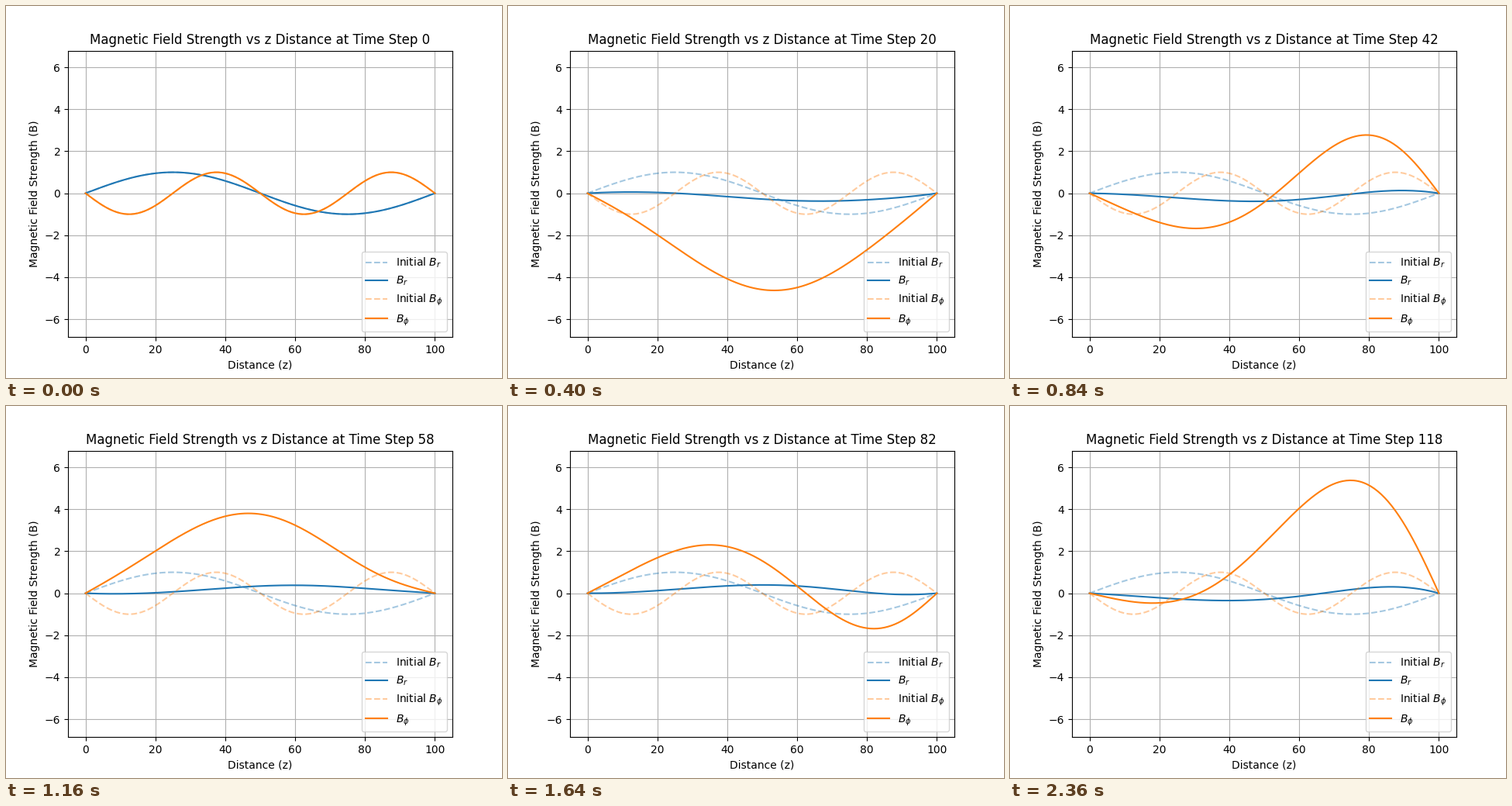
Animation, 640 px wide and 480 px high, one loop 2.4 s. Source, as a matplotlib script:

```python
import numpy as np
import matplotlib.pyplot as plt
from matplotlib.animation import FuncAnimation

FRAMES, INTERVAL, STRIDE = 60, 40, 2
MODES = 24

# Dynamo wave, all rates per time step
OMEGA = np.pi / 13.04   # oscillation
GROWTH = 0.0004         # amplitude growth
SHEAR = 4.6             # B_r -> B_phi
TAIL, FADE = 0.78, 6.0  # early loss of strength

n = np.arange(1, MODES + 1)
row, col = np.meshgrid(n, n, indexing="ij")
odd = (row + col) % 2 == 1
slope = np.where(odd, 4 * row * col / np.where(odd, row**2 - col**2, 1), 0)
decay = np.diag((n * np.pi) ** 2)


def system(dynamo):
    """Sine-mode matrix for (B_r, B_phi) with zero field at both ends."""
    return np.block([[-decay, -dynamo * slope], [np.eye(MODES), -decay]])


def leading(dynamo):
    values = np.linalg.eigvals(system(dynamo))
    return values[np.argmax(values.real)]


def find_dynamo(low=200.0, high=800.0):
    for _ in range(40):
        mid = (low + high) / 2
        value = leading(mid)
        if value.real / abs(value.imag) < GROWTH / OMEGA:
            low = mid
        else:
            high = mid
    return mid


dynamo = find_dynamo()
eta = OMEGA / abs(leading(dynamo).imag)
rates, vectors = np.linalg.eig(eta * system(dynamo))

z = np.linspace(0, 100, 201)
basis = np.sin(np.pi * np.outer(z / 100, n))
br0 = np.sin(2 * np.pi * z / 100)
bphi0 = -np.sin(4 * np.pi * z / 100)

start = np.zeros(2 * MODES)
start[1] = SHEAR / eta
start[MODES + 3] = -1
weights = np.linalg.solve(vectors, start.astype(complex))


def fields(step):
    state = (vectors @ (weights * np.exp(rates * step))).real
    state *= TAIL + (1 - TAIL) * np.exp(-step / FADE)
    return basis @ state[:MODES] * eta / SHEAR, basis @ state[MODES:]


fig, ax = plt.subplots(figsize=(6.4, 4.8), dpi=100)
ax.plot(z, br0, "--", color="C0", alpha=0.4, label="Initial $B_r$")
br_line, = ax.plot(z, br0, color="C0", label="$B_r$")
ax.plot(z, bphi0, "--", color="C1", alpha=0.4, label=r"Initial $B_\phi$")
bphi_line, = ax.plot(z, bphi0, color="C1", label=r"$B_\phi$")
ax.set_ylim(-6.856, 6.797)
ax.set_xlabel("Distance (z)")
ax.set_ylabel("Magnetic Field Strength (B)")
ax.grid(True)
ax.legend(loc="lower right")
title = ax.set_title("")


def update(frame):
    step = frame * STRIDE
    br, bphi = fields(step)
    br_line.set_ydata(br)
    bphi_line.set_ydata(bphi)
    title.set_text(f"Magnetic Field Strength vs z Distance at Time Step {step}")
    return br_line, bphi_line, title


anim = FuncAnimation(fig, update, frames=FRAMES, interval=INTERVAL,
                     repeat=True, blit=False)
plt.show()
```
